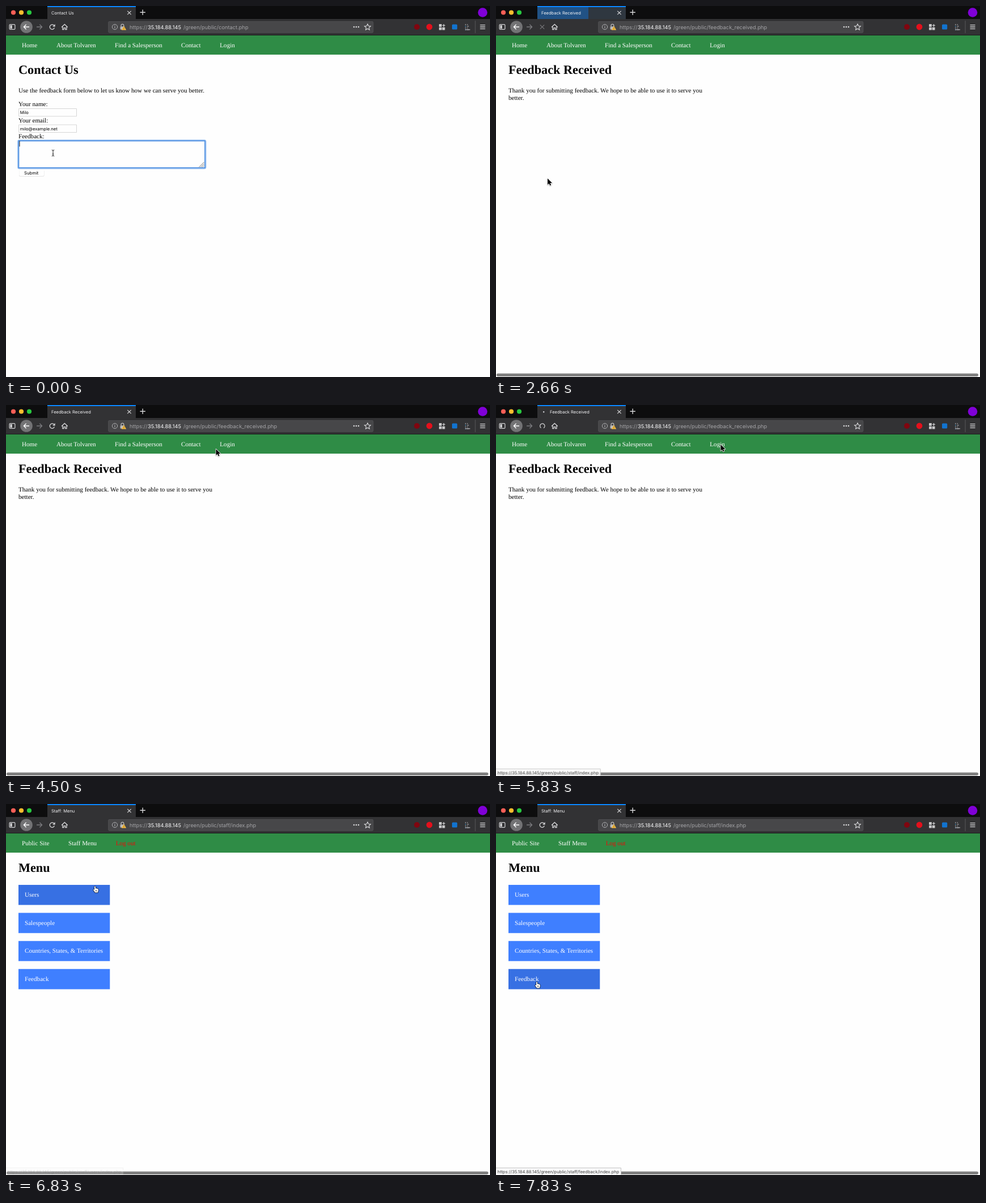
An HTML page with a canvas that plays this animation: 854 px wide and 656 px high, repeating every 8000 ms.

```html
<!DOCTYPE html>
<html lang="en">
<head>
<meta charset="utf-8">
<title>Feedback form</title>
<style>
html, body { margin: 0; width: 100%; height: 100%; overflow: hidden; background: #fefefe; }
canvas { display: block; }
</style>
</head>
<body>
<canvas id="stage" width="854" height="656"></canvas>
<script>
const ctx = document.getElementById('stage').getContext('2d');
ctx.textRendering = 'geometricPrecision';

const LOOP = 8000, STEP = 1000 / 6;
const SERIF = '"Liberation Serif", "Times New Roman", serif';
const SANS = 'Inter, sans-serif';
const MONO = '"Liberation Mono", monospace';
const HOST = '35.184.88.145';
const PAYLOAD = "<script>alert('qrw52 - XSS');<\/script>";
const ICON = '#d6d6d8';

// Pointer path: [step, x, y], linear between entries
const PATH = [
  [0, 83, 260], [4, 83, 260], [5, 80, 268], [7, 64, 327], [9, 54, 304], [11, 50.5, 294],
  [14, 50.5, 294], [16, 91, 305], [20, 327, 149], [24, 391, 108], [27, 370.5, 78],
  [28, 370.5, 78], [31, 404, 70], [32, 404, 70], [33, 396.5, 70], [39, 396.5, 70],
  [40, 290, 105], [41, 157, 145], [43, 128, 210], [44, 110, 258], [46, 75, 316], [47, 72, 314]
];

const MENU = [
  ['Users', 'users'], ['Salespeople', 'salespeople'],
  ['Countries, States, & Territories', 'countries'], ['Feedback', 'feedback']
];
const menuTop = i => 143 + i * 49.6;

const ARROW = new Path2D('M0 0V11L2.6 8.7 4.3 12.4 6.1 11.6 4.5 8H8Z');
const HAND = new Path2D('M-.9 6V1Q0-.4.9 1V4.2Q5.8 3.8 5.8 6.4V8.4L4.8 11.4H.2L-3 7Q-2.8 5.2-.9 6.6Z');

function rect(x, y, w, h, color, radius = 0) {
  ctx.fillStyle = color;
  ctx.beginPath();
  ctx.roundRect(x, y, w, h, radius);
  ctx.fill();
}

function frame(x, y, w, h, color, width = 1, radius = 0) {
  ctx.strokeStyle = color;
  ctx.lineWidth = width;
  ctx.beginPath();
  ctx.roundRect(x, y, w, h, radius);
  ctx.stroke();
}

function circle(x, y, r, color) {
  rect(x - r, y - r, 2 * r, 2 * r, color, r);
}

function line(d, color = ICON, width = 1.2) {
  ctx.strokeStyle = color;
  ctx.lineWidth = width;
  ctx.stroke(new Path2D(d));
}

function text(str, x, y, size, family, color, weight = '') {
  ctx.font = `${weight} ${size}px ${family}`;
  ctx.fillStyle = color;
  ctx.fillText(str, x, y);
}

const body = (str, x, y, color = '#000') => text(str, x, y, 11.12, SERIF, color);

function pointer(step) {
  const i = Math.max(1, PATH.findIndex(p => p[0] >= step));
  const [s0, x0, y0] = PATH[i - 1], [s1, x1, y1] = PATH[i];
  const k = (step - s0) / (s1 - s0);
  return [x0 + (x1 - x0) * k, y0 + (y1 - y0) * k];
}

function drawTab(step, title, loading) {
  rect(0, 0, 854, 24, '#0d0d0e');
  rect(73, 0, 156, 24, '#323234');
  const age = step - (step < 30 ? 16 : 37);
  if (age >= 0 && age < 3) {
    ctx.globalAlpha = [0.36, 0.2, 0.08][age];
    rect(73, 0, [90, 140, 156][age], 23, '#0a84ff');
    ctx.globalAlpha = 0.06;
    rect(73, 0, 156, 23, '#0a84ff');
    ctx.globalAlpha = 1;
  }
  rect(73, 0, 156, 2, '#0a84ff');
  ['#ff5f57', '#ffbd2e', '#28c940'].forEach((c, i) => circle(13 + 14 * i, 11.5, 4.1, c));
  if (loading) rect(step % 2 ? 83 : 86, 11, step % 2 ? 2.4 : 4, 2.4, '#d0d0d4', 1);
  text(title, loading ? 95 : 80, 15, 7.55, SANS, '#f4f4f6');
  line('M214.3 8.8l6.4 6.4m0-6.4l-6.4 6.4');
  line('M236.5 11.3h9.4m-4.7-4.7v9.4', ICON, 1.4);
  circle(841, 11.5, 8.3, '#8000d7');
}

function drawReload(step) {
  if (step === 14 || step === 35) {
    line('M79.5 40.6a4.2 4.2 0 1 1 4.4.2');
  } else if ((step > 14 && step < 19) || (step > 35 && step < 40)) {
    line('M77.8 33.3l7.4 7.4m0-7.4l-7.4 7.4', step === 15 || step === 36 ? ICON : '#77777a');
  } else {
    line('M85.4 38.6a4.2 4.2 0 1 1-.9-4.4', ICON, 1.3);
    ctx.fillStyle = ICON;
    ctx.fill(new Path2D('M86.6 32v4.4h-4.4Z'));
  }
}

function drawToolbar(step, file) {
  rect(0, 23, 854, 29, '#323234');
  rect(0, 51, 854, 1, '#1b1b1c');
  frame(6.1, 32.6, 9.8, 8.8, ICON, 1.2, 1.5);
  rect(7.5, 34, 3.2, 6, ICON);
  circle(36, 37, 10.8, '#737375');
  line('M41 37H31.4m4.2-4.2L31.4 37l4.2 4.2', '#fff', 1.4);
  line('M54 37h9.6m-4.2-4.2l4.2 4.2-4.2 4.2', '#7b7b7e', 1.3);
  drawReload(step);
  line('M98 37.4l5.4-5 5.4 5M99.8 36.4v5.2h2.3v-3h2.6v3h2.3v-5.2', ICON, 1.3);

  rect(180.5, 27, 467.5, 20.5, '#474749', 2);
  frame(180.5, 27.5, 467.5, 19.5, '#545457', 0.7, 2);
  ctx.strokeStyle = '#b0b0b3';
  frame(187.4, 32.4, 9.2, 9.2, '#b0b0b3', 1, 4.6);
  line('M192 36.3v3.2m0-5.2v1.1', '#b0b0b3', 1.1);
  rect(201.6, 36.3, 7.6, 5.4, '#b9b9bb', 1);
  line('M203 36.5v-2a2.4 2.4 0 0 1 4.8 0v2', '#b9b9bb', 1.3);
  ctx.fillStyle = '#ffbf3c';
  ctx.fill(new Path2D('M208 35.6l4.2 7h-8.4Z'));
  line('M208 38v2.2m0 .7v.8', '#4a4020', 0.8);
  text('https://', 218, 40.5, 9.3, SANS, '#a3a3a6');
  text(HOST, 250, 40.5, 9.3, SANS, '#f7f7f8');
  text('/green/public/' + file, 313, 40.5, 9.3, SANS, '#a3a3a6');
  [614, 618, 622].forEach(x => circle(x, 37, 1.3, ICON));
  line('M638 31.8l1.6 3.5 3.8.4-2.8 2.6.8 3.8-3.4-1.9-3.4 1.9.8-3.8-2.8-2.6 3.8-.4Z', ICON, 1.1);

  circle(725, 37, 5, '#800610');
  circle(747, 37, 5.4, '#e3101c');
  [[764, 32], [764, 37.7], [769.7, 37.7]].forEach(([x, y]) => rect(x, y, 4.8, 4.8, '#c8c8ca', 0.5));
  line('M769.9 34.4h5m-2.5-2.5v5', '#c8c8ca', 1.3);
  rect(787, 32.4, 9.2, 9.2, '#1273cf', 1.5);
  for (let i = 0; i < 4; i++) {
    const y = 32.3 + i * 3;
    rect(810, y, 1.6, 1.1, i % 2 ? '#4aa3d8' : '#bcbcc0');
    rect(813.5, y, i % 2 ? 3 : 1.6, 1.1, '#bcbcc0');
    if (i === 3) rect(810, y, 9, 1.1, '#bcbcc0');
  }
  rect(827.5, 26, 1, 22, '#58585b');
  line('M836.5 33.6h9m-9 3.4h9m-9 3.4h9', ICON, 1.3);
}

function drawHeader(title, links) {
  rect(0, 52, 854, 34, '#2f8c46');
  links.forEach(([label, x, color = '#fff']) => body(label, x, 73, color));
  text(title, 22, 120.3, 22.24, SERIF, '#000', 'bold');
}

const PUBLIC_LINKS = [['Home', 28], ['About Tolvaren', 89], ['Find a Salesperson', 192],
  ['Contact', 309], ['Login', 377.3]];
const STAFF_LINKS = [['Public Site', 28], ['Staff Menu', 110], ['Log out', 193.7, '#ee0b08']];

function field(y, value) {
  frame(22.5, y + 0.5, 102, 13.5, '#d2d2d2', 0.9);
  text(value, 24.7, y + 10, 7.6, SANS, '#000');
}

function drawForm(step) {
  drawHeader('Contact Us', PUBLIC_LINKS);
  body('Use the feedback form below to let us know how we can serve you better.', 22, 152.7);
  body('Your name:', 22, 177);
  field(181, 'Milo');
  body('Your email:', 22, 205.5);
  field(209.5, 'milo@example.net');
  body('Feedback:', 22, 233.7);

  const focused = step < 11, pasted = step >= 3;
  if (focused) frame(21.7, 238, 330.2, 48.8, '#a5c8f4', 3.4, 2);
  frame(22.3, 238.3, 328.8, 48, focused ? '#4f8fe0' : '#7d7d7d', focused ? 1.6 : 1);
  line('M340.5 285l9-9m-6 9l6-6m-3 6l3-3', '#555', 0.8);
  if (pasted) {
    text(PAYLOAD, 23.4, 246, 9.04, MONO, '#000');
    ctx.setLineDash([1.3, 1]);
    line('M148.5 247.6h16.5', '#e01010', 1.3);
    ctx.setLineDash([]);
  }
  if (focused && (step < 6 || step > 8)) rect(pasted ? 229.8 : 23.5, 238.8, 0.9, 9.6, '#000');

  rect(23, 290, 44.5, 11.4, '#dcdcdc', 2);
  rect(23.3, 289.6, 43.9, 11.2, '#fefefe', 2);
  text('Submit', 32, 298.3, 7.7, SANS, '#000');
}

function drawThanks() {
  drawHeader('Feedback Received', PUBLIC_LINKS);
  body('Thank you for submitting feedback. We hope to be able to use it to serve you', 22, 152.7);
  body('better.', 22, 166);
}

function drawMenu(hovered) {
  drawHeader('Menu', STAFF_LINKS);
  MENU.forEach(([label], i) => {
    rect(22, menuTop(i), 161.3, 35.6, i === hovered ? '#3770e3' : '#3f7fff');
    body(label, 33, menuTop(i) + 21, '#fff');
  });
}

function drawStatus(path, alpha) {
  const url = `https://${HOST}/green/public/staff/${path}`;
  ctx.font = `7.6px ${SANS}`;
  const w = ctx.measureText(url).width + 5.5;
  ctx.globalAlpha = alpha;
  rect(0, 643.5, w, 12.5, '#f9f9fa');
  line(`M0 643.5H${w}V656`, '#c4c4c4', 1);
  text(url, 2.4, 652.8, 7.6, SANS, '#404040');
  ctx.globalAlpha = 1;
}

function drawPointer(x, y, kind) {
  ctx.save();
  ctx.translate(x, y);
  ctx.lineJoin = 'round';
  if (kind === 'beam') {
    const beam = 'M-2.2-5.4Q0-5.4 0-4V4Q0 5.4-2.2 5.4M2.2-5.4Q0-5.4 0-4M0 4Q0 5.4 2.2 5.4M-1.2 1.8h2.4';
    line(beam, '#fff', 2);
    line(beam, '#222', 1);
  } else {
    const hand = kind === 'hand', shape = hand ? HAND : ARROW;
    ctx.strokeStyle = hand ? '#000' : '#fff';
    ctx.fillStyle = hand ? '#fff' : '#000';
    ctx.lineWidth = hand ? 1.1 : 1.6;
    ctx.shadowColor = 'rgba(0,0,0,.35)';
    ctx.shadowBlur = 1.5;
    ctx.shadowOffsetY = 0.7;
    ctx.stroke(shape);
    ctx.shadowColor = 'transparent';
    ctx.fill(shape);
    if (hand) line('M1.4 7v2.6m1.6-2.6v2.6', '#000', 0.6);
  }
  ctx.restore();
}

function draw(step) {
  const page = step < 16 ? 0 : step < 37 ? 1 : 2;
  const loading = step === 14 || step === 15 || step === 35 || step === 36;
  const [x, y] = pointer(step);
  const hovered = page === 2
    ? MENU.findIndex((_, i) => x >= 22 && x < 183 && y >= menuTop(i) && y < menuTop(i) + 35.6) : -1;

  rect(0, 0, 854, 656, '#fefefe');
  drawTab(step, ['Contact Us', 'Feedback Received', 'Staff: Menu'][page], loading);
  drawToolbar(step, ['contact.php', 'feedback_received.php', 'staff/index.php'][page]);
  if (page === 0) drawForm(step);
  else if (page === 1) drawThanks();
  else drawMenu(hovered);

  if (page > 0) rect(1, 649.7, 850, 5.2, '#7f7f7f', 2.6);
  const onLogin = step >= 33 && step < 35;
  if (onLogin) drawStatus('index.php', 1);
  if (step === 35) drawStatus('index.php', 0.85);
  if (hovered >= 0) drawStatus(MENU[hovered][1] + '/index.php', step === 41 ? 0.2 : step === 42 ? 0.7 : 1);

  drawPointer(x, y, step < 6 ? 'beam' : onLogin || hovered >= 0 ? 'hand' : 'arrow');
}

function tick() {
  const t = performance.now() % LOOP;
  draw(Math.floor((t + 8) / STEP) % 48);
  requestAnimationFrame(tick);
}
tick();
</script>
</body>
</html>
```
